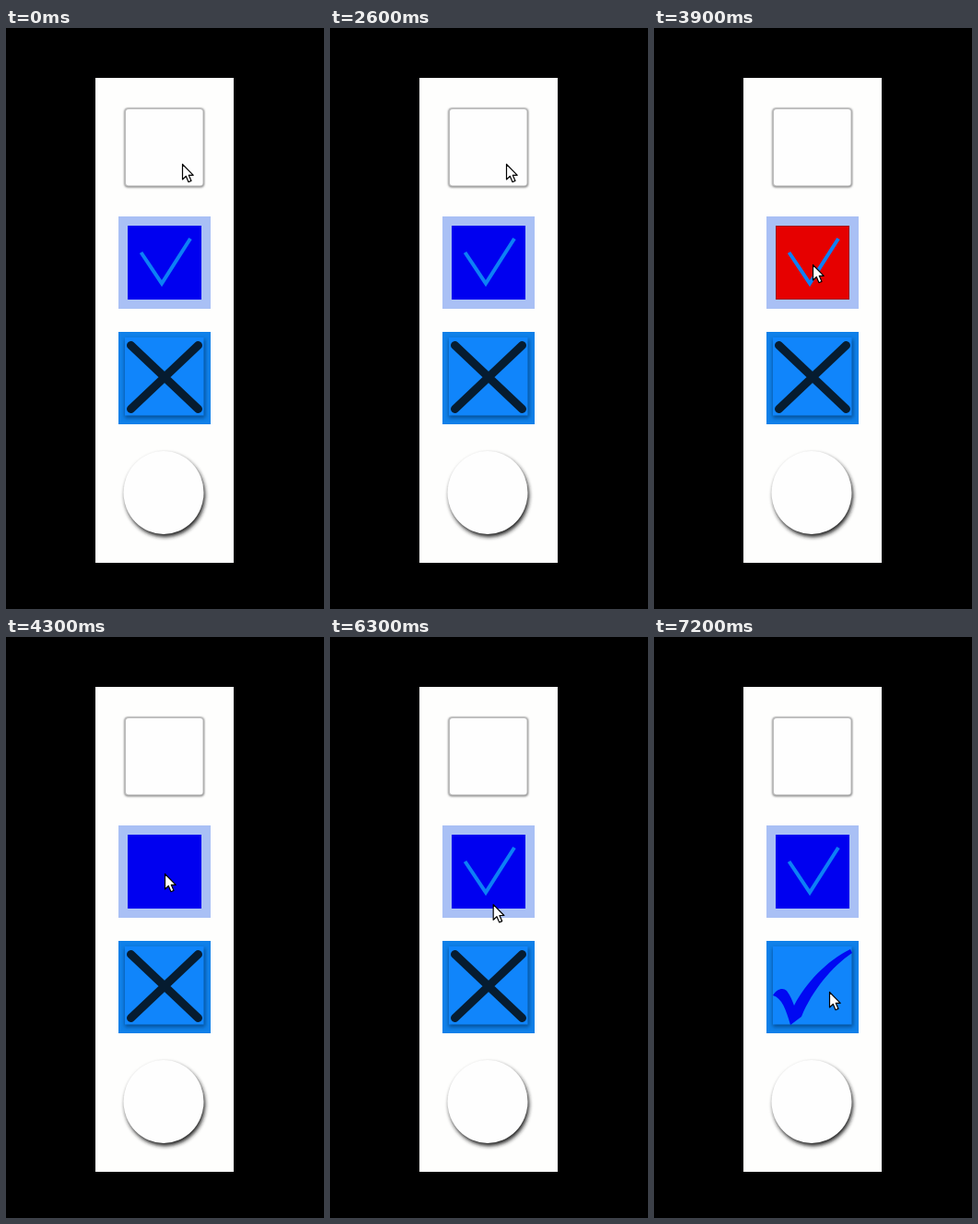
An HTML page for the animation above (8 s loop, 345 px wide and 629 px high).

```html
<!DOCTYPE html>
<html lang="en">
<head>
<meta charset="utf-8">
<title>Check boxes</title>
<style>
  html, body { margin: 0; width: 100%; height: 100%; overflow: hidden; background: #000; }
  svg { display: block; width: 100vw; height: 100vh; }
</style>
</head>
<body>
<svg viewBox="0 0 345 629" xmlns="http://www.w3.org/2000/svg">
  <defs>
    <filter id="soft" x="-20%" y="-20%" width="140%" height="140%"><feGaussianBlur stdDeviation="1.1"/></filter>
    <filter id="raised" x="-20%" y="-20%" width="140%" height="140%"><feGaussianBlur stdDeviation="2"/></filter>
    <pattern id="weave" width="20" height="20" patternUnits="userSpaceOnUse" patternTransform="translate(122 329) rotate(38)">
      <rect width="20" height="20" fill="#64171f"/>
      <path d="M0 1H10M0 5H10M0 9H10M10 11H20M10 15H20M10 19H20M11 0V10M15 0V10M19 0V10M1 10V20M5 10V20M9 10V20" stroke="#42101a" stroke-width="1.2"/>
      <path d="M0 3H10M10 13H20M13 0V10M3 10V20" stroke="#76232b" stroke-width="1"/>
    </pattern>
    <path id="cross" d="M135.5 343.5L208.5 412.5M208.5 343.5L135.5 412.5" fill="none" stroke-width="9" stroke-linecap="round"/>
  </defs>

  <rect width="345" height="629" fill="#000"/>
  <rect x="97" y="54" width="150" height="525" fill="#fefefd"/>

  <g id="plain">
    <rect x="128.5" y="87" width="86.5" height="85.5" rx="4" fill="#777" filter="url(#soft)"/>
    <rect x="128.5" y="86.5" width="86" height="85" rx="4" fill="#bbb"/>
    <rect x="130" y="88" width="83.5" height="82.5" rx="3" fill="#fefefe"/>
  </g>
  <g id="filled">
    <rect x="127.5" y="85.5" width="88.5" height="88" rx="5" fill="#a5d8ef"/>
    <rect x="128.3" y="86.2" width="87" height="86.5" rx="4.5" fill="#1daae3"/>
    <path id="whiteTick" d="M142 130L161 148L202 110" fill="none" stroke="#fefefe" stroke-width="8"/>
  </g>

  <rect x="122" y="204" width="100" height="100" fill="#a9c0f5"/>
  <rect id="core" x="132" y="214" width="80" height="80"/>
  <rect id="coreEdge" x="132.5" y="214.5" width="79" height="79" fill="none" stroke="#a01010"/>
  <path id="thinTick" d="M146.5 243L169 276.5L200 228" fill="none" stroke="#0d80f5" stroke-width="4"/>

  <rect x="122" y="329" width="100" height="100" fill="#0f80e9"/>
  <rect x="129" y="337" width="87" height="85" fill="#05407d" opacity=".8" filter="url(#raised)"/>
  <rect x="129" y="335" width="85.5" height="84.5" fill="#1085fb"/>
  <use id="darkCross" href="#cross" stroke="#061c30"/>
  <path id="boldTick" fill="#0008f2" d="M129 388C133 381 140 379 144 383C148 388 150 394 152 399C165 374 187 351 213 338L215 342C193 357 172 382 160 411L148 420C143 403 139 391 129 388Z"/>
  <g id="woven">
    <rect x="122" y="329" width="100" height="100" fill="url(#weave)"/>
    <path d="M122 329H222V429H122ZM129 335V420H214.5V335Z" fill="#360911" fill-rule="evenodd" opacity=".4"/>
    <path d="M128 422H216" stroke="#2c080e" stroke-width="2" stroke-dasharray="4 2"/>
    <use href="#cross" stroke="#140509"/>
  </g>

  <ellipse cx="172.5" cy="506" rx="43.5" ry="45" fill="#222" filter="url(#raised)"/>
  <ellipse cx="171" cy="503" rx="43.5" ry="45" fill="#fefefe"/>

  <path id="pointer" d="M.5 .5V17L4.3 13.5L7 19.7L10 18.4L7.3 12.3H12.2Z" fill="#fefefe" stroke="#000" stroke-width="1.2" stroke-linejoin="round"/>
</svg>
<script>
  const LOOP = 8000, STEP = 100;
  const el = id => document.getElementById(id);
  const show = (id, on) => el(id).setAttribute('opacity', Number(on));
  const within = (t, from, to) => t >= from && t < to;

  // Pointer moves land on whole steps, the first at the start time.
  function travel(t, start, count) {
    const done = Math.floor((t - start) / STEP) + 1;
    const p = Math.max(0, Math.min(1, done / count));
    return p * p * (3 - 2 * p);
  }

  function render(t) {
    const first = within(t, 1500, 2600);
    show('plain', !first);
    show('filled', first);
    show('whiteTick', t >= 1700);

    const red = within(t, 3900, 4300) || within(t, 5200, 5400);
    el('core').setAttribute('fill', red ? '#e60000' : '#0000f0');
    show('coreEdge', red);
    show('thinTick', !within(t, 4300, 5400));

    show('darkCross', t < 7100);
    show('boldTick', t >= 7100);
    show('woven', within(t, 6800, 7100) ? 1 : within(t, 7100, 7200) ? 0.5 : 0);

    const a = travel(t, 3000, 5), b = travel(t, 6300, 3);
    const x = 191 - 19 * a + 18 * b, y = 147 + 109 * a + 128 * b;
    el('pointer').setAttribute('transform', `translate(${x} ${y})`);
  }

  const begin = performance.now();
  function tick() {
    render((performance.now() - begin) % LOOP);
    requestAnimationFrame(tick);
  }
  tick();
</script>
</body>
</html>
```
